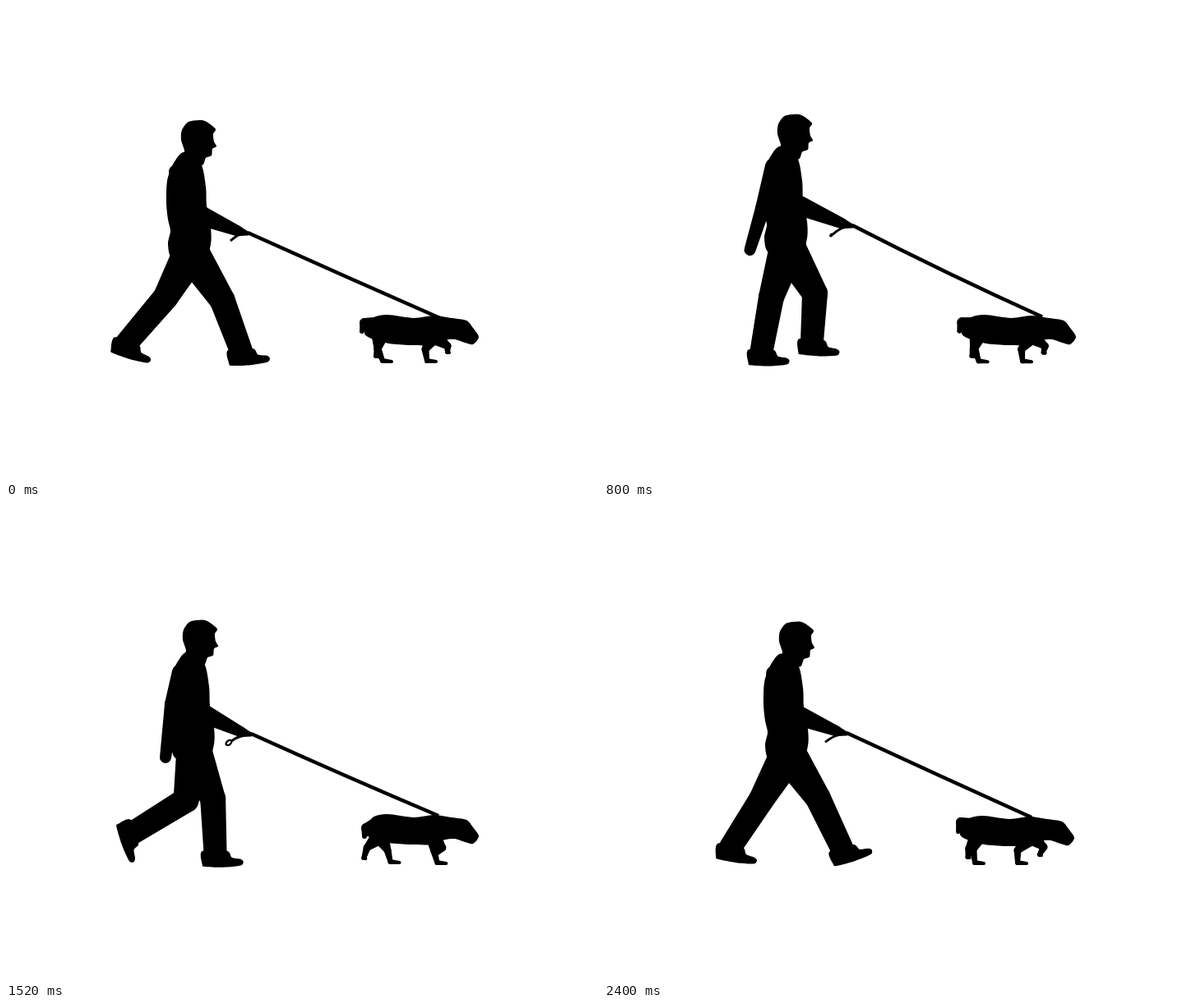
These frames come from a looping animation (720x576 px, 2480 ms). An HTML page with a canvas:

```html
<!DOCTYPE html>
<html lang="en">
<head>
<meta charset="utf-8">
<title>Walking the dog</title>
<style>
  html, body { margin: 0; width: 100%; height: 100%; overflow: hidden; background: #fff; }
  canvas { display: block; }
</style>
</head>
<body>
<canvas id="stage" width="720" height="576"></canvas>
<script>
const LOOP = 2480, TICK = 80, DOG_STEPS = 6, STEP = 1000;
const ctx = document.getElementById('stage').getContext('2d');

// Rigid outlines
const points = s => s.split(' ').map(p => p.split(',').map(Number));
const head = points('238,139 247,143 255,150 252,156 253,165 256,171 251,174 250,182 243,185 238,194 216,184 217,176 213,163 214,151 222,141');
const torso = points('216,178 203,193 196,213 195,240 197,260 200,274 197,290 203,308 240,312 249,290 249,270 244,243 243,220 237,192');
const shoe = points('-16,-2 -16,14 -13,17 10,18 31,16 34,11 30,8 20,6 14,-2');
const dogBody = points('436,396 446,379 464,375 496,379 520,376 542,379 560,382 568,391 575,402 568,411 558,409 546,405 534,406 519,412 492,412 466,410 442,403');

// time, head x y, torso x, elbow y, fingertip x y
const body = [
  [0, 0, 0, 0, 256, 296, 277],
  [320, 0, -5, 2, 253, 299, 275],
  [640, -2, -11, -1, 243, 302, 269],
  [960, -2, -3.5, -3, 244, 306, 267],
  [1240, 0, 1, 0, 249, 303, 272],
  [1520, 2, -1.5, 4, 251, 300, 277],
  [1840, 1, -8, 2, 243, 304, 275],
  [2400, 0, .5, -1, 255, 297, 276]
];

// time, elbow x y, hand x y
const freeArm = [
  [0, 212, 240, 220, 270],
  [320, 212, 240, 220, 270],
  [640, 199, 248, 192, 298],
  [960, 187, 245, 163, 296],
  [1120, 186, 246, 161, 294],
  [1520, 202, 240, 194, 305],
  [1840, 212, 240, 220, 270]
];

// time, middle y at x 410, collar x y, handle x y, ring size
const leash = [
  [0, 328, 530, 381, 273, 286, 0],
  [320, 331, 530, 380, 271, 283, 0],
  [640, 322, 533, 378, 271, 282, 3],
  [960, 320, 533, 379, 282, 276, 0],
  [1520, 326, 526, 376, 271, 287, 4],
  [1840, 323, 527, 375, 272, 282, 4],
  [2400, 328, 520, 378, 268, 287, 1]
];

// One stride: time, knee x y, ankle x y, shoe angle
const stride = [
  [0, 263, 358, 286, 420, -.08],
  [320, 250, 355, 250, 421, 0],
  [640, 219, 352, 212, 421, 0],
  [960, 188, 357, 171, 420, 0],
  [1160, 191, 357, 154, 414, .15],
  [1240, 194, 355, 147, 410, .3],
  [1330, 200, 356, 143, 401, .65],
  [1540, 221, 357, 156, 396, 1.3],
  [1840, 251, 346, 199, 394, .95],
  [1880, 254, 346, 219, 402, .6],
  [2200, 259, 354, 287, 414, -.5],
  [2400, 260, 354, 290, 417, -.3]
];

// Dog, STEP units per step: phase, shift x y, tail middle x y, tail tip x y
const dogSway = [
  [0, 0, 1, 436, 386, 433, 396],
  [323, 0, 1, 435, 391, 425, 406],
  [452, -1, -2, 433, 389, 422, 403],
  [548, 0, 0, 437, 391, 434, 400],
  [677, 0, -1, 438, 391, 436, 401],
  [774, 0, 2, 438, 396, 432, 409],
  [806, -3, 1, 434, 384, 431, 395]
];

// phase, joint x y, toe x y
const hindLeg = [
  [0, 452, 418, 452, 427],
  [323, 470, 419, 489, 430],
  [500, 468, 418, 484, 433],
  [725, 463, 418, 477, 433],
  [806, 449, 417, 462, 434],
  [1000, 452, 417, 469, 433],
  [1323, 437, 415, 438, 432],
  [1500, 434, 414, 424, 431],
  [1740, 441, 415, 442, 427]
];
const foreLeg = [
  [0, 537, 414, 539, 422],
  [323, 536, 415, 550, 432],
  [500, 526, 418, 544, 434],
  [725, 519, 418, 533, 434],
  [806, 503, 418, 514, 434],
  [1000, 510, 418, 523, 433],
  [1323, 500, 417, 504, 433],
  [1500, 519, 418, 503, 422],
  [1725, 534, 414, 529, 425]
];

// Values at a time, blended between neighbouring rows of a cycle.
function pose(rows, time, cycle = LOOP) {
  const t = time % cycle;
  const i = rows.findLastIndex(r => r[0] <= t);
  const [from, ...a] = rows[i];
  const [to, ...b] = rows[(i + 1) % rows.length];
  const k = (t - from) / ((to || cycle) - from);
  return a.map((v, n) => v + (b[n] - v) * k);
}

// Closed smooth outline
function shape(pts) {
  const n = pts.length, soft = .13, at = i => pts[(i + n) % n];
  ctx.beginPath();
  ctx.moveTo(...pts[0]);
  for (let i = 0; i < n; i++) {
    const p = at(i - 1), a = at(i), b = at(i + 1), q = at(i + 2);
    ctx.bezierCurveTo(
      a[0] + (b[0] - p[0]) * soft, a[1] + (b[1] - p[1]) * soft,
      b[0] - (q[0] - a[0]) * soft, b[1] - (q[1] - a[1]) * soft, ...b);
  }
  ctx.fill();
}

const shift = (pts, dx, dy) => pts.map(([x, y]) => [x + dx, y + dy]);

// Tapered limb with round ends
function limb(x1, y1, r1, x2, y2, r2) {
  const a = Math.atan2(y2 - y1, x2 - x1), q = Math.PI / 2;
  ctx.beginPath();
  ctx.arc(x1, y1, r1, a + q, a - q);
  ctx.arc(x2, y2, r2, a - q, a + q);
  ctx.fill();
}

function curve(width, x, y, cx, cy, x2, y2) {
  ctx.lineWidth = width;
  ctx.beginPath();
  ctx.moveTo(x, y);
  ctx.quadraticCurveTo(cx, cy, x2, y2);
  ctx.stroke();
}

function drawLeg(t, hipX, hipY) {
  const [kx, ky, ax, ay, turn] = pose(stride, t);
  limb(hipX, hipY, 22, kx, ky, 15.5);
  limb(kx, ky, 15.5, ax, ay, 14);
  const c = Math.cos(turn), s = Math.sin(turn);
  shape(shoe.map(([x, y]) => [ax + x * c - y * s, ay + x * s + y * c]));
}

function drawMan(t) {
  const [hx, hy, bx, elbow, tx, ty] = pose(body, t);
  shape(shift(head, hx, hy));
  shape(shift(torso, bx, hy));
  for (const lag of [0, LOOP / 2]) drawLeg(t + lag, 225 + bx, 300 + hy * .9);

  const [ex, ey, fx, fy] = pose(freeArm, t);
  limb(207 + bx, 202 + hy, 9, ex, ey, 9);
  limb(ex, ey, 9, fx, fy, 7);

  limb(239, elbow, 12, tx - 14, ty - 3, 6.5);
  limb(tx - 14, ty - 3, 6.5, tx - 2, ty, 2.5);

  const [my, cx, cy, rx, ry, ring] = pose(leash, t);
  // control point that takes the curve through the middle height
  const k = (410 - tx) / (cx - tx);
  const bend = (my - ty * (1 - k) ** 2 - cy * k * k) / (2 * k * (1 - k));
  curve(4.6, tx - 2, ty - 1, (tx + cx) / 2, bend, cx, cy);
  curve(3, tx - 14, ty + 2, rx + 6, ry - 5, rx + ring, ry - ring / 2);
  if (ring > 1) {
    ctx.lineWidth = 2.4;
    ctx.beginPath();
    ctx.ellipse(rx, ry, ring, ring * .6, -.7, 0, 2 * Math.PI);
    ctx.stroke();
  }
}

function drawPaw(rows, phase, x, y, r) {
  const p = phase % (2 * STEP);
  const [jx, jy, tx, ty] = pose(rows, p, 2 * STEP);
  const paw = p > 200 && p < 1400 ? 11 : 2;
  limb(x, y, r, jx, jy, 4.5);
  limb(jx, jy, 4.5, tx - paw, ty - 1, 3);
  limb(tx - paw, ty - 1, 3, tx, ty, 2);
}

function drawDog(phase) {
  const [dx, dy, mx, my, tx, ty] = pose(dogSway, phase, STEP);
  shape(shift(dogBody, dx, dy));
  limb(448, 385, 6, mx, my, 6);
  limb(mx, my, 6, tx, ty, 3);
  for (const lag of [0, STEP]) {
    drawPaw(hindLeg, phase + lag, 455, 400, 11);
    drawPaw(foreLeg, phase + lag, 520, 402, 10);
  }
}

function draw(t) {
  ctx.fillStyle = '#fff';
  ctx.fillRect(0, 0, 720, 576);
  ctx.fillStyle = ctx.strokeStyle = '#000';
  drawMan(t);
  drawDog(t / LOOP * DOG_STEPS * STEP);
}

const start = performance.now();
function tick() {
  const t = (performance.now() - start) % LOOP;
  draw(Math.floor(t / TICK) * TICK);
  requestAnimationFrame(tick);
}
tick();
</script>
</body>
</html>
```
